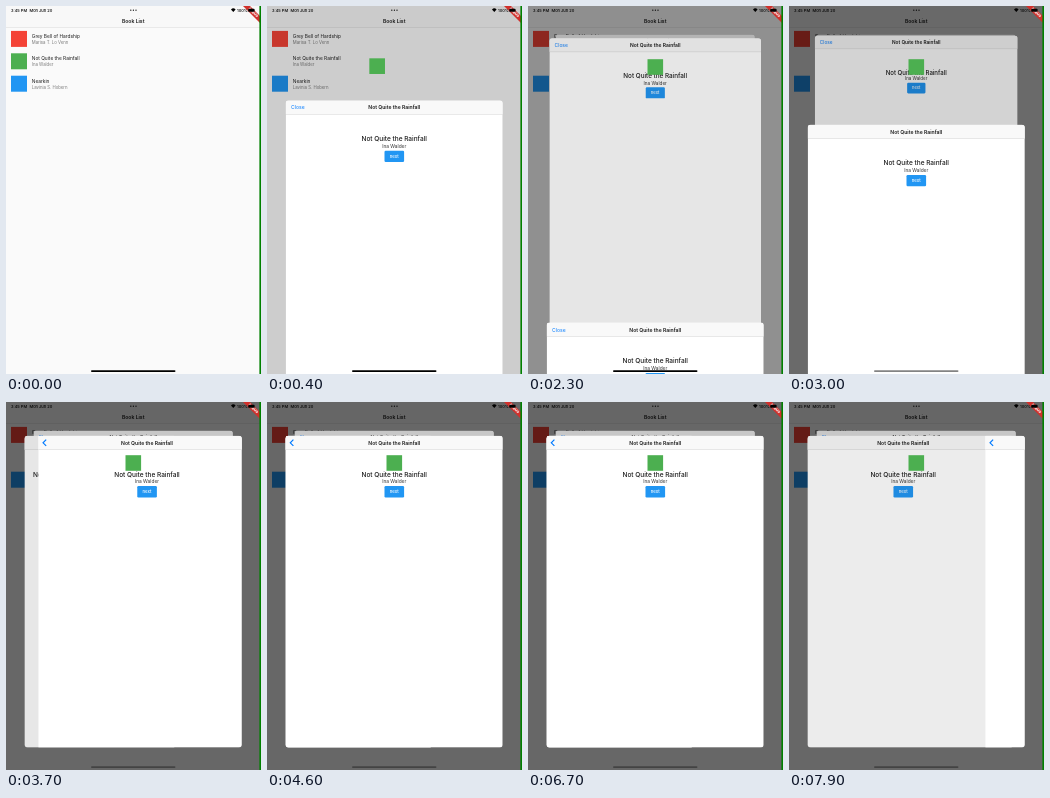
Animation, 255 px wide and 368 px high, one loop 8000 ms. Source, as an HTML page:

```html
<!DOCTYPE html>
<html lang="en">
<head>
<meta charset="utf-8">
<title>Book List</title>
<style>
  html, body { margin: 0; width: 100%; height: 100%; overflow: hidden; background: #fafafa; }
  svg { display: block; width: 100%; height: 100%; }
  text { font-family: Inter, Roboto, sans-serif; dominant-baseline: central; fill: #1c1c1c; }
  .mid { text-anchor: middle; }
  .bar { font-size: 5.1px; font-weight: 600; }
  .row { font-size: 4.8px; }
  .by { font-size: 4.3px; fill: #7c7c7c; }
  .status { font-size: 4px; font-weight: 500; fill: #000; }
</style>
</head>
<body>
<svg id="stage" viewBox="0 0 255 368" preserveAspectRatio="none"></svg>
<script>
const LOOP = 8000, STEP = 100;
const LEFT = 18.7, TOP = 33.8, WIDTH = 217, HEIGHT = 311.8, MID = 127.2;
const BLUE = '#007aff', GREEN = '#4caf50';
const books = [
  ['Grey Bell of Hardship', 'Marisa T. Lo Venn', '#f44336'],
  ['Not Quite the Rainfall', 'Ina Walder', GREEN],
  ['Nearkin', 'Lavinia S. Hobern', '#2196f3'],
];
const [title, author] = books[1];

// Each sheet: first and last step of opening, share left after the first step
const openings = [
  [300, 500, .5], [1600, 1900, .87], [2300, 2600, .7], [2900, 3200, .7], [4900, 5200, .7],
];
const closing = [6400, 6700, .65];
const NESTED = 3;
// Push and pop time of the pages inside the nested sheet
const pushes = [[3500, 7800], [4200, 7100]];

const rect = (x, y, w, h, fill, extra = '') =>
  `<rect x="${x}" y="${y}" width="${w}" height="${h}" fill="${fill}" ${extra}/>`;
const text = (x, y, cls, str, extra = '') =>
  `<text x="${x}" y="${y}" class="${cls}" ${extra}>${str}</text>`;

function list() {
  const rows = books.map(([name, by, color], i) => {
    const y = 24.9 + i * 22.4;
    return (i === 1 ? '' : rect(5, y, 16, 16, color)) +
      text(25.8, y + 5.1, 'row', name) + text(25.8, y + 11.5, 'by', by);
  }).join('');
  return rect(0, 0, 255, 368, '#fafafa') + rect(0, 0, 255, 21, '#f8f8f8') +
    rect(0, 21, 255, .35, '#c8c8c8') + text(MID, 15, 'bar mid', 'Book List') + rows;
}

function page(lead, enabled = true) {
  const leads = {
    close: text(24, 40.8, '', 'Close', `style="font-size:5.1px;fill:${BLUE}"`),
    back: `<path d="M26.4 37.7l-3.1 3.1 3.1 3.1" fill="none" stroke="${BLUE}" stroke-width="1.2"/>`,
    none: '',
  };
  return rect(LEFT, TOP, WIDTH, HEIGHT, '#fff') +
    rect(LEFT, TOP, WIDTH, 13.8, '#f9f9f9') + rect(LEFT, 47.6, WIDTH, .35, '#c0c0c0') +
    leads[lead] + text(MID, 40.8, 'bar mid', title) +
    text(MID, 72.6, 'mid', title, 'style="font-size:6.5px;font-weight:500"') +
    text(MID, 79.2, 'mid', author, 'style="font-size:4.8px;fill:#333"') +
    rect(117.5, 84.1, 19.6, 11.3, enabled ? '#2196f3' : '#dfdfdf', 'rx="1.2"') +
    text(MID, 89.6, 'mid', 'next',
      `style="font-size:4.3px;font-weight:500;fill:${enabled ? '#fff' : '#a4a4a4'}"`);
}

function sheet(i) {
  const shade = n => rect(LEFT, TOP, WIDTH, HEIGHT, '#000', `id="dim${n}"`);
  const body = i === NESTED
    ? `<g id="page0">${page('none')}${shade(0)}</g>
       <g id="page1">${page('back')}${shade(1)}</g>
       <g id="page2">${page('back')}</g>`
    : page('close', i < NESTED);
  return rect(0, 0, 255, 368, '#000', `id="barrier${i}"`) +
    `<g id="sheet${i}"><g clip-path="url(#card)">${body}</g></g>`;
}

function chrome() {
  const dots = [124.8, 127.4, 130].map(x => `<circle cx="${x}" cy="4.2" r=".65"/>`).join('');
  return `<path d="M237 0h7l10 10v7z" fill="#d0302c"/>
    <text class="mid" transform="translate(247.3 6.7) rotate(45)"
      style="font-size:3.5px;font-weight:800;fill:#fff">DEBUG</text>` +
    text(5, 4.4, 'status', '3:45 PM') + text(23.5, 4.4, 'status', 'Mon Jun 20') + dots +
    `<path d="M225 3.4a3.2 3.2 0 0 1 4.6 0l-2.3 2.6z"/>` +
    text(231, 4.4, 'status', '100%') + rect(242.2, 2.8, 6.4, 3, '#000', 'rx=".9"') +
    rect(85, 364.2, 84.5, 1.8, '#000', 'rx=".9" id="home"') + rect(253.4, 0, 1.6, 368, '#008000');
}

const stage = document.getElementById('stage');
stage.innerHTML = `<defs><clipPath id="card">${rect(LEFT, TOP, WIDTH, HEIGHT, '#000', 'rx="3"')}</clipPath></defs>` +
  list() + openings.map((_, i) => sheet(i)).join('') +
  rect(0, 0, 1, 1, GREEN, 'id="cover"') + chrome();

const set = (id, attrs) => {
  const el = document.getElementById(id);
  for (const key in attrs) el.setAttribute(key, attrs[key]);
};
const mix = (a, b, p) => a + (b - a) * p;

// Decaying approach from 0 to 1
function settle(t, start, end, rest, decay = .3) {
  if (t < start) return 0;
  return t >= end ? 1 : 1 - rest * decay ** ((t - start) / STEP);
}

function sheetLevel(t, i) {
  const open = settle(t, ...openings[i]);
  return i === openings.length - 1 ? open * (1 - settle(t, ...closing)) : open;
}

function pageLevel(t, [push, pop]) {
  return t < pop ? settle(t, push, push + 400, .3, .46) : 1 - settle(t, pop, pop + 400, .67, .27);
}

function pageDim(t, [push, pop]) {
  if (t < push || t >= pop + 400) return 0;
  const level = t < pop ? Math.min(1, (t - push + STEP) / 300) : 1 - (t - pop) / 500;
  return .094 * level;
}

function draw(t) {
  const levels = openings.map((_, i) => sheetLevel(t, i));
  levels.forEach((p, i) => {
    const covered = levels[i + 1] || 0;
    const y = TOP + 404 * (1 - p) - 5 * covered;
    set('barrier' + i, { opacity: .2 * p ** .6 });
    set('sheet' + i, {
      visibility: p > 0 ? 'visible' : 'hidden',
      transform: `translate(${MID} ${y}) scale(${1 - .083 * covered}) translate(${-MID} ${-TOP})`,
    });
  });

  const [a, b] = pushes.map(times => pageLevel(t, times));
  const xs = [-72 * a, WIDTH * (1 - a) - 72 * b, WIDTH * (1 - b)];
  xs.forEach((x, i) => set('page' + i, { transform: `translate(${x} 0)` }));
  pushes.forEach((times, i) => set('dim' + i, { opacity: pageDim(t, times) }));

  const p = levels[0], size = mix(16, 15.6, p);
  set('cover', { x: mix(5, 119.5, p), y: mix(47.3, 53.2, p), width: size, height: size });
  // The home bar fades once the backdrop is dark
  set('home', { opacity: mix(1, .35, levels[NESTED]) });
}

function tick() {
  draw(Math.floor(performance.now() % LOOP / STEP) * STEP);
  requestAnimationFrame(tick);
}
tick();
</script>
</body>
</html>
```
